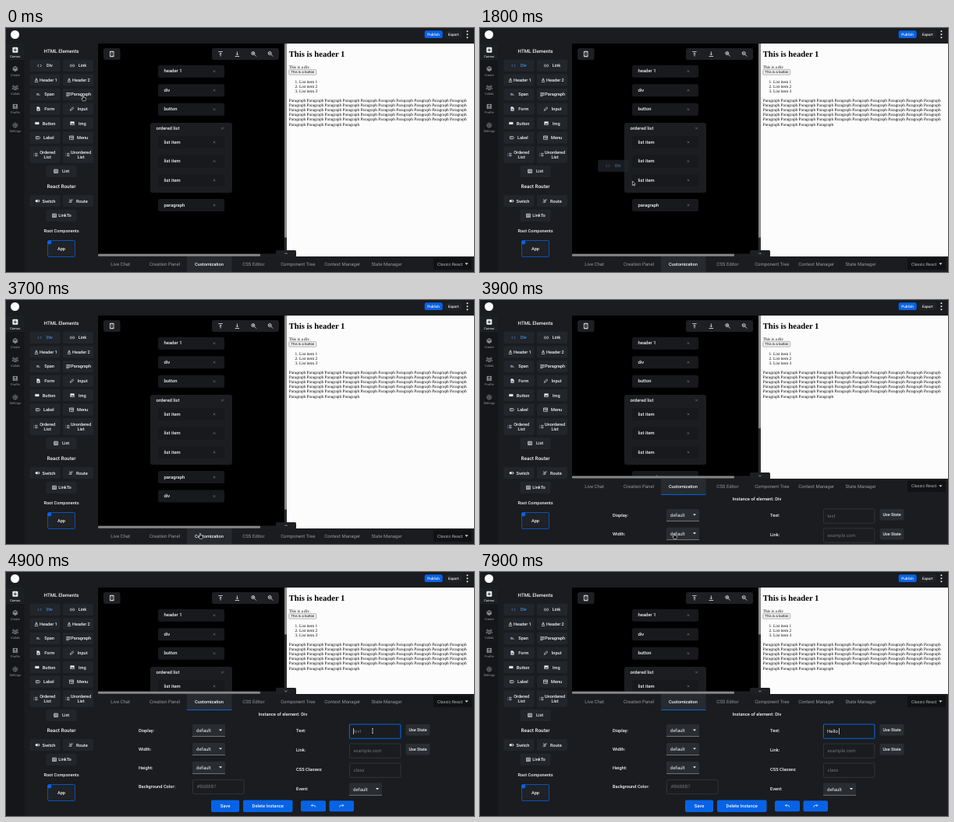
Animation of 600x314 px, one loop 8000 ms. Source, as an HTML page:

```html
<!DOCTYPE html>
<html lang="en">
<head>
<meta charset="utf-8">
<title>Prototype editor</title>
<style>
  html, body { margin: 0; width: 100%; height: 100%; overflow: hidden; background: #1a1c1f; }
  svg { display: block; width: 100%; height: 100%; }
  text { font-family: Roboto, sans-serif; text-rendering: geometricPrecision; white-space: pre; }
  .serif { font-family: "Liberation Serif", serif; }
  .arial { font-family: "Liberation Sans", sans-serif; }
</style>
</head>
<body>
<svg id="stage" viewBox="0 0 600 314"></svg>
<script>
const stage = document.getElementById('stage');
const BLUE = '#0763e6', LINK = '#4b8fe8', WHITE = '#f2f3f4', GREY = '#96999d';
const PANEL = '#1a1c1f', BUTTON = '#222529';
const LOOP = 8000, SLIDE = 137;

function add(parent, tag, attrs, content) {
  const el = document.createElementNS('http://www.w3.org/2000/svg', tag);
  for (const k in attrs) el.setAttribute(k, attrs[k]);
  if (content !== undefined) el.textContent = content;
  return parent.appendChild(el);
}
const group = (parent, attrs = {}) => add(parent, 'g', attrs);
const rect = (parent, x, y, width, height, fill, rx = 0, more = {}) =>
  add(parent, 'rect', { x, y, width, height, fill, rx, ...more });

// y is the visual middle of the line
function label(parent, str, x, y, size = 6, more = {}) {
  return add(parent, 'text', { x, y: y + size * 0.35, 'font-size': size, fill: WHITE, ...more }, str);
}
const centered = (parent, str, x, y, size, more = {}) =>
  label(parent, str, x, y, size, { 'text-anchor': 'middle', ...more });

// Icons on a 24 unit grid; the solid ones are filled, with holes
const ICONS = {
  code: 'M9 6L3 12L9 18M15 6L21 12L15 18',
  link: 'M10 7H7A5 5 0 0 0 7 17H10M14 7H17A5 5 0 0 1 17 17H14M8 12H16',
  header: 'M6 17L12 4L18 17M8 13H16M4 21H20',
  span: 'M3 9H14M3 14H20',
  para: 'M2 5H22M2 10H22M2 15H22M2 20H14',
  form: 'M5 3H14L19 8V21H5ZM9 11H15V18H9Z',
  pen: 'M4 20L5 15L16 4L20 8L9 19Z',
  button: 'M3 7H21V17H3Z',
  image: 'M3 4H21V20H3ZM5 18L10 10L13 14L16 11L20 18Z',
  tag: 'M3 6H17L22 12L17 18H3ZM7 12H15',
  menu: 'M3 4H21V20H3ZM3 9H21M10 14H18',
  list: 'M3 6H5M3 12H5M3 18H5M9 6H21M9 12H21M9 18H21',
  table: 'M3 4H21V20H3ZM9 4V20M12 8H18M12 12H18M12 16H18M5 8H7M5 12H7M5 16H7',
  toggle: 'M7 7H17A5 5 0 0 1 17 17H7A5 5 0 0 1 7 7ZM12 8H19V16H12Z',
  route: 'M5 6H9V18H15V6H19M5 15V20M19 4V9',
  device: 'M5 2H19V22H5ZM5 4H19M5 20H19M10 12H14',
  top: 'M4 3H20M12 21V8M8 12L12 8L16 12',
  bottom: 'M4 21H20M12 3V16M8 12L12 16L16 12',
  zoomIn: 'M15 9A6 6 0 1 1 3 9A6 6 0 1 1 15 9ZM14 14L21 21M9 6V12M6 9H12',
  zoomOut: 'M15 9A6 6 0 1 1 3 9A6 6 0 1 1 15 9ZM14 14L21 21M6 9H12',
  close: 'M5 5L19 19M19 5L5 19',
  up: 'M5 15L12 8L19 15',
  down: 'M5 9L12 16L19 9',
  undo: 'M9 5L4 10L9 15M4 10H15Q20 10 20 17',
  redo: 'M15 5L20 10L15 15M20 10H9Q4 10 4 17',
  cube: 'M12 2L21 7V17L12 22L3 17V7ZM3 7L12 12L21 7M12 12V22',
  people: 'M8 7A3 3 0 1 1 8 6.9M22 7A3 3 0 1 1 22 6.9M15 10A3 3 0 1 1 15 9.9M1 19V14H7M23 19V14H17M7 20V16H17V20Z',
  person: 'M3 3H21V21H3ZM16 9A4 4 0 1 1 8 9A4 4 0 1 1 16 9ZM5 19Q12 12 19 19Z',
  gear: 'M19 12A7 7 0 1 1 19 11.9M15 12A3 3 0 1 1 15 11.9M12 1V5M12 19V23M1 12H5M19 12H23M4 4L7 7M17 17L20 20M20 4L17 7M7 17L4 20'
};
const SOLID = ['form', 'button', 'image', 'toggle', 'cube', 'person'];
function icon(parent, name, cx, cy, size = 6.6, color = WHITE) {
  const solid = SOLID.includes(name);
  return add(parent, 'path', {
    d: ICONS[name], transform: `translate(${cx - size / 2} ${cy - size / 2}) scale(${size / 24})`,
    fill: solid ? color : 'none', 'fill-rule': 'evenodd', stroke: color, 'stroke-width': solid ? 0.8 : 2.4
  });
}

rect(stage, 0, 0, 600, 314, PANEL);

// Canvas
const canvas = group(stage);
rect(canvas, 118, 20, 240, 294, '#000');
function node(name, y) {
  const g = group(canvas);
  rect(g, 195, y - 8, 85, 16, '#17191c', 2.5);
  label(g, name, 202.5, y - 0.5, 5.9, { 'font-weight': 500 });
  icon(g, 'close', 267, y, 4.6, GREY);
  return g;
}
['header 1', 'div', 'button'].forEach((name, i) => node(name, 55.7 + 24.5 * i));
rect(canvas, 185, 122, 105, 90, '#1b1d20', 3);
label(canvas, 'ordered list', 192.5, 128.7, 5.9, { 'font-weight': 500 });
icon(canvas, 'close', 277.5, 129, 4.6, GREY);
for (let i = 0; i < 3; i++) node('list item', 147 + 24.5 * i);
node('paragraph', 228);
const droppedNode = node('div', 252.5);

rect(canvas, 125, 26, 21.5, 15, '#1d1f23', 2.5);
icon(canvas, 'device', 135.7, 33.5, 8);
rect(canvas, 264, 26, 86, 15, '#1d1f23', 2.5);
['top', 'bottom', 'zoomIn', 'zoomOut'].forEach((n, i) => icon(canvas, n, 275 + 21.4 * i, 33.5, 8));

// Preview
rect(stage, 357, 20, 3, 294, '#2b2c2e');
const scrollThumb = rect(stage, 357, 20, 3, 0, '#8b8b8b', 1);
rect(stage, 360, 20, 240, 294, '#fcfcfc');
const page = (str, x, baseline, size = 5.333, more = {}) =>
  add(stage, 'text', { x, y: baseline, 'font-size': size, fill: '#000', class: 'serif', ...more }, str);
page('This is header 1', 362.7, 37, 10.667, { 'font-weight': 700 });
page('This is a div', 362.7, 52);
rect(stage, 362.8, 53.4, 35, 6.8, '#efefef', 1, { stroke: '#767676', 'stroke-width': 0.5 });
page('This is a button', 380.3, 58.3, 4.444, { class: 'arial', 'text-anchor': 'middle' });
for (let i = 0; i < 3; i++) {
  const y = 70.8 + 6.13 * i;
  page(`${i + 1}.`, 374.4, y, 5.333, { 'text-anchor': 'end' });
  page(`List item ${i + 1}`, 376, y);
}
for (let row = 0; row < 6; row++) {
  page(Array(row < 5 ? 10 : 4).fill('Paragraph').join(' '), 362.7, 94.5 + 6.2 * row);
}

// Bottom panel, laid out in its open position
const drawer = group(stage);
rect(drawer, 118, 153.5, 240, 3.5, '#1d1e20');
rect(drawer, 118, 153.7, 208, 3, '#858585', 1);
rect(drawer, 346, 149, 26, 9, '#1d1f22', 1.5);
const chevronUp = icon(drawer, 'up', 359, 153.3, 5.5);
const chevronDown = icon(drawer, 'down', 359, 153.3, 5.5);
rect(drawer, 118, 157, 482, 160, PANEL);
rect(drawer, 232, 157, 57.5, 20, '#272b30');
rect(drawer, 232, 177, 57.5, 1, BLUE);
['Live Chat', 'Creation Panel', 'Customization', 'CSS Editor', 'Component Tree', 'Context Manager', 'State Manager']
  .forEach((name, i) => centered(drawer, name, 146.7 + 56.9 * i, 166.7, i === 2 ? 5.7 : 6,
    { fill: i === 2 ? WHITE : GREY, 'font-weight': i === 2 ? 500 : 400 }));
rect(drawer, 548, 159, 49, 15, '#101214', 1.5);
label(drawer, 'Classic React', 553, 166.7, 5.4, { fill: '#b3b5b8' });
const triangle = (x, y) => add(drawer, 'path', { d: `M${x - 2} ${y - 1}h4l-2 2.2z`, fill: WHITE });
triangle(590.5, 166.5);

centered(drawer, 'Instance of element: Div', 355, 183, 5.8, { 'font-weight': 500 });
const field = (name, x, y) => label(drawer, name, x, y, 5.7, { 'font-weight': 500 });
function select(x, y) {
  rect(drawer, x, y - 8, 42, 16, '#292c30', 1.5);
  rect(drawer, x, y + 7.4, 42, 0.6, '#a0a2a5');
  label(drawer, 'default', x + 5, y, 6);
  triangle(x + 36, y - 0.5);
}
function input(x, y, hint) {
  const box = rect(drawer, x, y - 9, 65.5, 18.3, '#1a1c1f', 1.5, { stroke: '#424549', 'stroke-width': 0.6 });
  return { box, hint: label(drawer, hint, x + 5, y, 6, { fill: '#6e7175' }) };
}
function button(x, y, width, height, fill, name, size = 5.8) {
  rect(drawer, x, y - height / 2, width, height, fill, 1.8);
  if (name) centered(drawer, name, x + width / 2, y, size, { 'font-weight': 500 });
}
['Display:', 'Width:', 'Height:', 'Background Color:'].forEach((name, i) => {
  field(name, 170, 204 + 23.9 * i);
  if (i < 3) select(239, 204 + 23.9 * i);
});
input(239.5, 276.3, '#B6B8B7');
['Text:', 'Link:', 'CSS Classes:', 'Event:'].forEach((name, i) => field(name, 372, 204.3 + 25 * i));
const textInput = input(440.4, 205, 'text');
input(440.4, 230, 'example.com');
input(440.4, 255, 'class');
select(440, 279.5);
button(512.5, 203.3, 31, 14.5, '#2a2d31', 'Use State', 5.4);
button(512.5, 228.3, 31, 14.5, '#2a2d31', 'Use State', 5.4);
button(263, 301.2, 36, 15.4, BLUE, 'Save');
button(304, 301.2, 63.5, 15.4, BLUE, 'Delete Instance');
button(378, 301.2, 32, 14, BLUE);
button(414.5, 301.2, 31.5, 14, BLUE);
icon(drawer, 'undo', 394, 301, 7.5);
icon(drawer, 'redo', 430.3, 301, 7.5);
const typed = label(drawer, '', 445, 205, 6);
const caret = rect(drawer, 445, 201, 0.7, 8, WHITE);

// Header
rect(stage, 0, 0, 600, 20, PANEL);
add(stage, 'circle', { cx: 11.5, cy: 8.5, r: 5.5, fill: '#fff' });
rect(stage, 536.7, 3.2, 23, 9.8, BLUE, 2);
centered(stage, 'Publish', 548, 8.2, 4.7, { 'font-weight': 500 });
rect(stage, 563, 3.2, 21.5, 9.8, '#202225', 2);
centered(stage, 'Export', 573.8, 8.2, 4.6, { 'font-weight': 500 });
[4.2, 8.2, 12.2].forEach(cy => add(stage, 'circle', { cx: 591.5, cy, r: 1, fill: WHITE }));

// Navigation
rect(stage, 0, 20, 23.5, 294, '#141619');
rect(stage, 0, 20, 23.5, 21, '#1d2023');
rect(stage, 8.3, 24.8, 7, 7, WHITE, 1);
add(stage, 'path', { d: 'M11.8 26.3v4M9.8 28.3h4', stroke: '#1d2023', 'stroke-width': 0.9 });
['Canvas', 'Create', 'Collab', 'Profile', 'Settings'].forEach((name, i) => {
  centered(stage, name, 11.8, 37 + 24 * i, 4, { fill: i ? GREY : WHITE });
  if (i) icon(stage, ['cube', 'people', 'person', 'gear'][i - 1], 11.8, 28.4 + 24.2 * i, 8, '#85888c');
});

// Element palette
const heading = (str, y, size) => centered(stage, str, 71, y, size, { 'font-weight': 500 });
function tile(parent, cx, cy, name, iconName, iconX, textX) {
  const g = group(parent);
  const lines = name.split('\n'), height = lines.length > 1 ? 21.5 : 15.3;
  rect(g, cx - 19.7, cy - height / 2, 39.4, height, BUTTON, 2);
  const sign = icon(g, iconName, iconX, cy);
  const texts = lines.map((line, i) => lines.length > 1
    ? centered(g, line, textX, cy - 3.4 + 6.8 * i, 5.6, { 'font-weight': 500 })
    : label(g, line, textX, cy, 5.6, { 'font-weight': 500 }));
  return { g, tint(color) { sign.setAttribute('stroke', color); texts[0].setAttribute('fill', color); } };
}
heading('HTML Elements', 29.7, 6.3);
const divTile = tile(stage, 50, 48.4, 'Div', 'code', 43, 52);
[
  ['Link', 'link', 85, 92.7],
  ['Header 1', 'header', 39, 43], ['Header 2', 'header', 81, 85],
  ['Span', 'span', 41.5, 49.3], ['Paragraph', 'para', 80, 83.3],
  ['Form', 'form', 41.5, 49.3], ['Input', 'pen', 84.5, 91.7],
  ['Button', 'button', 39.8, 46.8], ['Img', 'image', 85, 93],
  ['Label', 'tag', 41, 48], ['Menu', 'menu', 84, 91]
].forEach(([name, sign, iconX, textX], i) =>
  tile(stage, i % 2 ? 50 : 92.5, 48.4 + 18.55 * Math.floor((i + 1) / 2), name, sign, iconX, textX));
tile(stage, 50, 163, 'Ordered\nList', 'list', 38, 53.2);
tile(stage, 92.5, 163, 'Unordered\nList', 'list', 79, 96);
tile(stage, 71, 184.3, 'List', 'table', 64, 72);
heading('React Router', 204, 6.4);
tile(stage, 50, 222.7, 'Switch', 'toggle', 40.5, 46.5);
tile(stage, 92.5, 222.7, 'Route', 'route', 83, 90);
tile(stage, 71, 241.4, 'LinkTo', 'table', 62, 67.3);
heading('Root Components', 261.3, 5.6);
rect(stage, 53.5, 273.5, 35, 21, '#1f2226', 1.5, { stroke: '#0a57c8', 'stroke-width': 0.9 });
add(stage, 'circle', { cx: 55.7, cy: 275.8, r: 2.6, fill: BLUE });
heading('App', 284, 5.6);

// Dragged tile and pointer
const dragged = tile(stage, 0, 0, 'Div', 'code', -7, 2);
dragged.tint(LINK);
dragged.g.setAttribute('opacity', 0.75);
const outline = { fill: '#000', stroke: '#fff', 'stroke-width': 0.6, 'stroke-linejoin': 'round' };
const pointer = group(stage);
const shapes = {
  arrow: add(pointer, 'path', { d: 'M0 0V5.6L1.3 4.4L2.1 6.2L3 5.8L2.2 4.1H4Z', ...outline }),
  hand: add(pointer, 'path', { d: 'M-.6 0Q0 -.8 .6 0V2.4L3.4 3V5L2.6 6.8H-.6L-2.2 4L-1.6 3.4L-.6 4.2Z', ...outline }),
  fist: add(pointer, 'path', { d: 'M-1.8 1.8Q0 .4 2 1.8V4L1.4 5.6H-1.2L-2.2 3.6Z', ...outline, fill: '#bbb' }),
  beam: add(pointer, 'path', { d: 'M-1 -2.5Q0 -2.5 0 -2Q0 -2.5 1 -2.5M0 -2V3M-1 3.5Q0 3.5 0 3Q0 3.5 1 3.5', ...outline, fill: 'none' })
};

// Timelines: [ms, x, y]
const POINTER_PATH = [[100, 99, 87], [900, 57, 46], [1300, 57, 46], [1500, 174, 166.5], [2250, 234.5, 252.5],
  [2600, 234.5, 252.5], [3100, 239, 286], [3600, 249, 300.5], [4100, 249, 300.5], [4900, 470, 204]];
const DRAG_PATH = [[1300, 50, 48.4], [1500, 149.5, 146.8], [2250, 210, 233]];
const TYPING = [[0, ''], [5500, 'H'], [5700, 'He'], [6100, 'Hell'], [7600, 'Hello'], [7800, 'Hello ']];

const clamp = v => Math.min(1, Math.max(0, v));
function along(path, t) {
  let i = 0;
  while (i < path.length - 2 && t >= path[i + 1][0]) i++;
  const [t0, x0, y0] = path[i], [t1, x1, y1] = path[i + 1];
  const p = clamp((t - t0) / (t1 - t0)), e = p * p * (3 - 2 * p);
  return [x0 + (x1 - x0) * e, y0 + (y1 - y0) * e];
}
const show = (el, on) => el.setAttribute('display', on ? 'inline' : 'none');
const moveTo = (el, [x, y]) => el.setAttribute('transform', `translate(${x} ${y})`);

function pointerShape(t) {
  if (t >= 4750) return 'beam';
  if (t < 1300 || (t > 3450 && t < 3950)) return 'hand';
  return t >= 2250 && t < 2500 ? 'fist' : 'arrow';
}

function draw(t) {
  const blend = clamp((t - 950) / 250);
  const mix = (a, b) => Math.round(a + (b - a) * blend);
  divTile.tint(`rgb(${mix(242, 75)},${mix(243, 143)},${mix(244, 232)})`);

  show(dragged.g, t >= 1350 && t < 2250);
  moveTo(dragged.g, along(DRAG_PATH, t));
  show(droppedNode, t >= 2500);

  const closed = SLIDE * (1 - clamp((t - 3814) / 186));
  moveTo(drawer, [0, closed]);
  show(chevronUp, t < 3814);
  show(chevronDown, t >= 3814);
  const view = 133 + closed;
  scrollThumb.setAttribute('height', view * view / 292);

  const focused = t >= 4900;
  textInput.box.setAttribute('stroke', focused ? BLUE : '#424549');
  textInput.box.setAttribute('stroke-width', focused ? 1.1 : 0.6);
  const value = TYPING.filter(([at]) => t >= at).pop()[1];
  if (typed.textContent !== value) typed.textContent = value;
  show(textInput.hint, !value);
  show(caret, focused && !(t >= 6600 && t < 7100));
  caret.setAttribute('x', 445 + (value ? typed.getComputedTextLength() : 0));

  moveTo(pointer, along(POINTER_PATH, t));
  show(pointer, t < 5400);
  for (const name in shapes) show(shapes[name], name === pointerShape(t));
}

const start = performance.now();
function tick() {
  draw((performance.now() - start) % LOOP);
  requestAnimationFrame(tick);
}
tick();
</script>
</body>
</html>
```
